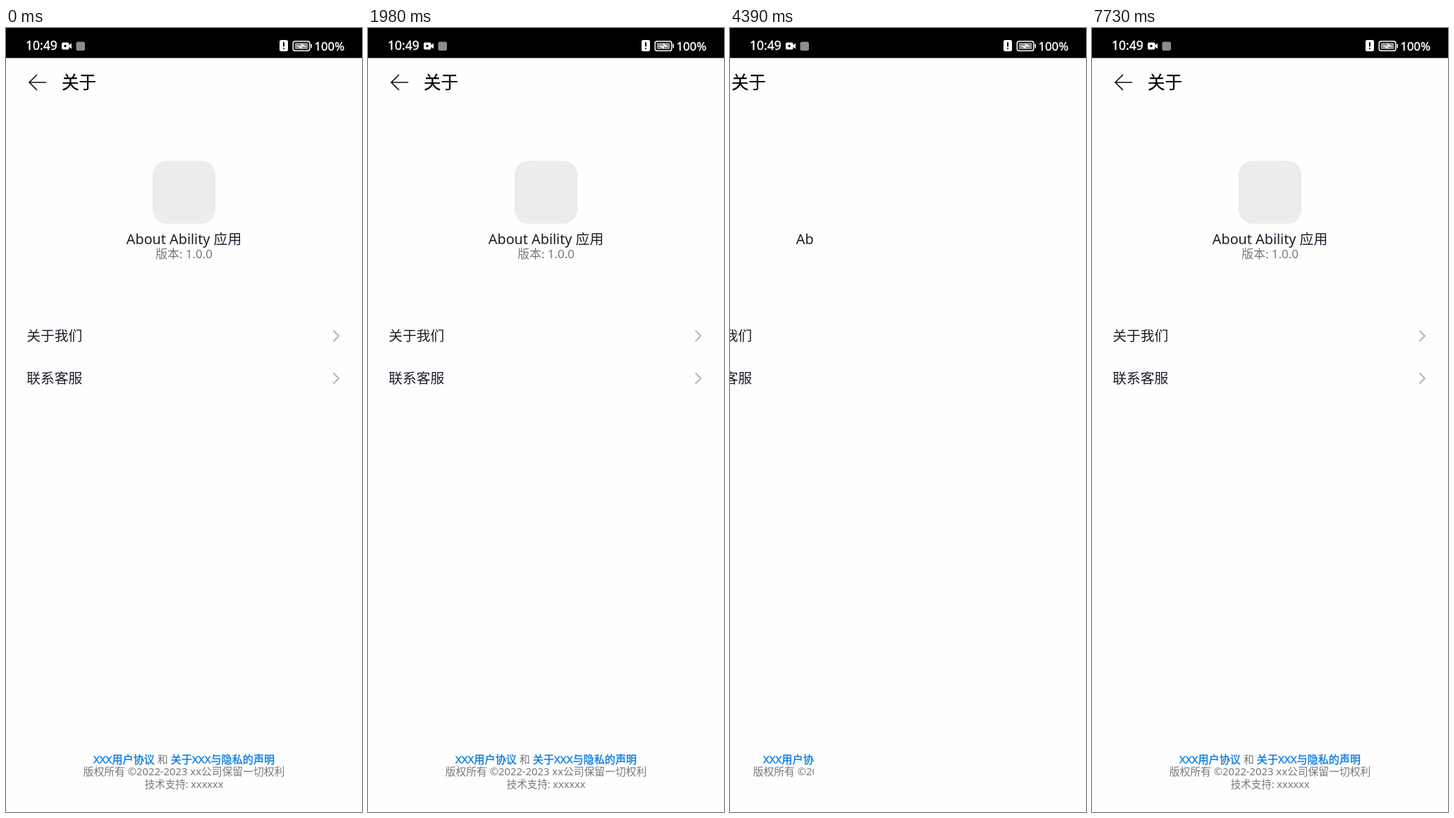
These frames come from a looping animation (505 px wide and 1110 px high, 8 s). An HTML page:

```html
<!DOCTYPE html>
<html lang="zh-CN">
<head>
<meta charset="utf-8">
<title>关于</title>
<style>
html, body { margin: 0; width: 100%; height: 100%; overflow: hidden; background: #fefefe; }
svg { display: block; }
text { font-family: "Noto Sans", "Noto Sans CJK SC", "Noto Sans CJK", sans-serif; text-spacing-trim: space-all; }
.line { fill: none; stroke-linecap: round; stroke-linejoin: round; }
</style>
</head>
<body>
<svg id="stage" width="505" height="1110" viewBox="0 0 505 1110"></svg>
<script>
const W = 505, LOOP = 8000;
const INK = '#191e2b', GRAY = '#77787a', BLUE = '#087be0';

// bold is the width of a thin outline that thickens the strokes
const text = (x, y, size, str, fill = '#000', anchor = 'start', bold = 0) =>
  `<text x="${x}" y="${y}" font-size="${size}" fill="${fill}" text-anchor="${anchor}" stroke="${fill}" stroke-width="${bold}">${str}</text>`;
const mid = (y, size, str, fill) => text(252.5, y, size, str, fill, 'middle');
const link = str => `<tspan fill="${BLUE}" stroke="${BLUE}" stroke-width=".35">${str}</tspan>`;
const rect = (x, y, w, h, r, fill) =>
  `<rect x="${x}" y="${y}" width="${w}" height="${h}" rx="${r}" fill="${fill}"/>`;
const line = (d, color, width) => `<path class="line" d="${d}" stroke="${color}" stroke-width="${width}"/>`;
const page = bg => rect(0, 42, W, 1068, 0, bg);
const arrow = line('M56.5 77H33M43.5 66.5L33 77L43.5 87.5', '#111', 1.7);
const header = title => arrow + text(79, 85.5, 24.5, title, '#000', 'start', 0.25);

const menuRow = (y, label) =>
  text(29.2, y + 7.3, 19.8, label, INK) + line(`M465 ${y - 7}l7 7l-7 7`, '#b4b5b7', 2);

const about = page('#fefefe') + header('关于') +
  rect(208, 188, 89, 89, 20, '#ececec') +
  mid(305.5, 19.8, 'About Ability 应用', INK) +
  mid(325.5, 16.9, '版本: 1.0.0', GRAY) +
  menuRow(436, '关于我们') + menuRow(496, '联系客服') +
  mid(1041, 15.1, `${link('XXX用户协议')} 和 ${link('关于XXX与隐私的声明')}`, GRAY) +
  mid(1058, 14.8, '版权所有 ©2022-2023 xx公司保留一切权利', GRAY) +
  mid(1075.5, 14.5, '技术支持: xxxxxx', GRAY);

const cardRow = (y, label, value) =>
  text(31.5, y + 7.3, 19.8, label, INK) + text(473.5, y + 6.3, 16.7, value, GRAY, 'end');
const cardPage = (title, ...rows) => page('#f0f1f3') + header(title) +
  rect(17, 122, 471, 128, 27, '#fefefe') + rect(32, 185.5, 441, 1, 0, '#f7f7f8') +
  rows.map((r, i) => cardRow(156 + i * 60, ...r)).join('');

const editIcon =
  line('M267.5 174V182Q267.5 188.5 261 188.5H243Q236.5 188.5 236.5 182V159.5Q236.5 153 243 153H261Q267.5 153 267.5 159.5V160', BLUE, 3) +
  line('M243 162H258M243 170.5H253', BLUE, 2.8) +
  line('M252 179L268 164.5', '#fefefe', 7) + line('M252 179L268 164.5', BLUE, 3.6);

const heading = (x, y, str) => text(x, y, 19.8, str);
const body = (x, y, ...lines) => lines.map((s, i) => text(x, y + i * 20, 17.2, s)).join('');
const terms = page('#fefefe') + arrow + '<g id="doc">' + editIcon +
  mid(231, 22.4, 'XX用户协议', INK) +
  mid(257, 17.4, '更新日期：20XX年X月X日', GRAY) +
  heading(41, 308.5, '1. 关于我们') +
  body(37, 334.5,
    '“XX“【业务团队填写产品名称】及相关技术与功能（以',
    '下合成为”本服务“）由XX【业务团队填写实际的运营公',
    '司名称】运营，本协议中的”您“与”用户“指任何使用和/或',
    '访问本服务的个人。') +
  heading(41, 445.5, '2. 协议目的') +
  heading(41, 499, '3. 使用资格') +
  heading(41, 552.5, '4. 本服务') +
  text(35, 606, 15, '......', '#000', 'start', 0.4) +
  heading(34, 658, '20. 联系我们') +
  body(35.5, 689, '如您对本协议又任何疑问，请通过如下信息联系我们：', 'XXX。') + '</g>';

const statusBar = rect(0, 0, W, 42.5, 0, '#000') +
  text(28, 31, 17.5, '10:49', '#fff', 'start', 0.4) +
  rect(79, 20.5, 10.5, 10, 2, '#fff') + '<path d="M88 25.5L93 21.5V29.5Z" fill="#fff"/>' +
  '<circle cx="84" cy="25.5" r="1.7"/>' +
  rect(99.5, 19.5, 12.5, 12.5, 2.5, '#8c8c8c') +
  rect(388, 17, 12, 16, 2.5, '#fff') + rect(393, 20, 2, 6.5, 1, '#000') + rect(393, 28, 2, 2, 1, '#000') +
  rect(406.5, 18, 25, 15, 3.5, '#fff') + rect(408, 19.5, 22, 12, 2.5, '#000') +
  rect(409.5, 21, 19, 9, 1.5, '#8e8e8e') + rect(432.3, 22.5, 1.6, 6, 0.8, '#fff') +
  '<path d="M411.5 24.5L419 26L418.5 21.8L426.5 26.8L419.5 25.8L420 29.5Z" fill="#fff"/>' +
  text(437.5, 31.5, 16.7, '100%', '#fff', 'start', 0.4);

// Each front page: time it is opened and time it is closed
const visits = [
  { open: 400, close: 1219, art: cardPage('关于我们', ['官方网站', 'www.xxx.com'], ['公众号', 'tunep']) },
  { open: 2110, close: 3220, art: cardPage('联系客服', ['客服热线', '12xxx'], ['官方邮箱', 'xxx@yyy.com']) },
  { open: 4218, close: 6240, art: terms }
];
const DOC_READY = 4600;

// Touches: start, end, x, y
const taps = [[1030, 1370, 39, 93], [3212, 3400, 42, 86], [6005, 6280, 44, 80]];

const $ = id => document.getElementById(id);
$('stage').innerHTML = '<clipPath id="cut"><rect id="cutBox" y="0" width="505" height="1110"/></clipPath>' +
  `<g id="back">${about}</g><g clip-path="url(#cut)">` +
  visits.map((v, i) => `<g id="front${i}">${v.art}</g>`).join('') + '</g>' +
  '<circle id="tap" r="15.3" fill="#fbfbff" fill-opacity=".5" stroke="#d4d2e6" stroke-width="2.4"/>' + statusBar;

// Critically damped spring from 0 to 1
const spring = ms => {
  const u = Math.max(0, ms) * 0.016;
  return 1 - (1 + u) * Math.exp(-u);
};

function draw(t) {
  const current = visits.findLastIndex(v => t >= v.open);
  const v = visits[current];
  const edge = v ? Math.round(W * (1 - spring(t - v.open) + spring(t - v.close))) : W;

  $('cutBox').setAttribute('x', edge);
  $('back').setAttribute('transform', `translate(${Math.round((edge - W) * 0.2)})`);
  visits.forEach((_, i) => {
    const front = $('front' + i);
    front.style.display = i === current && edge < W ? '' : 'none';
    front.setAttribute('transform', `translate(${Math.round(edge / 2)})`);
  });
  $('doc').style.display = t < DOC_READY ? 'none' : '';

  const tap = taps.find(([from, to]) => t >= from && t < to);
  $('tap').style.display = tap ? '' : 'none';
  if (tap) $('tap').setAttribute('transform', `translate(${tap[2]} ${tap[3]})`);
}

function tick() {
  draw(performance.now() % LOOP);
  requestAnimationFrame(tick);
}
tick();
</script>
</body>
</html>
```
